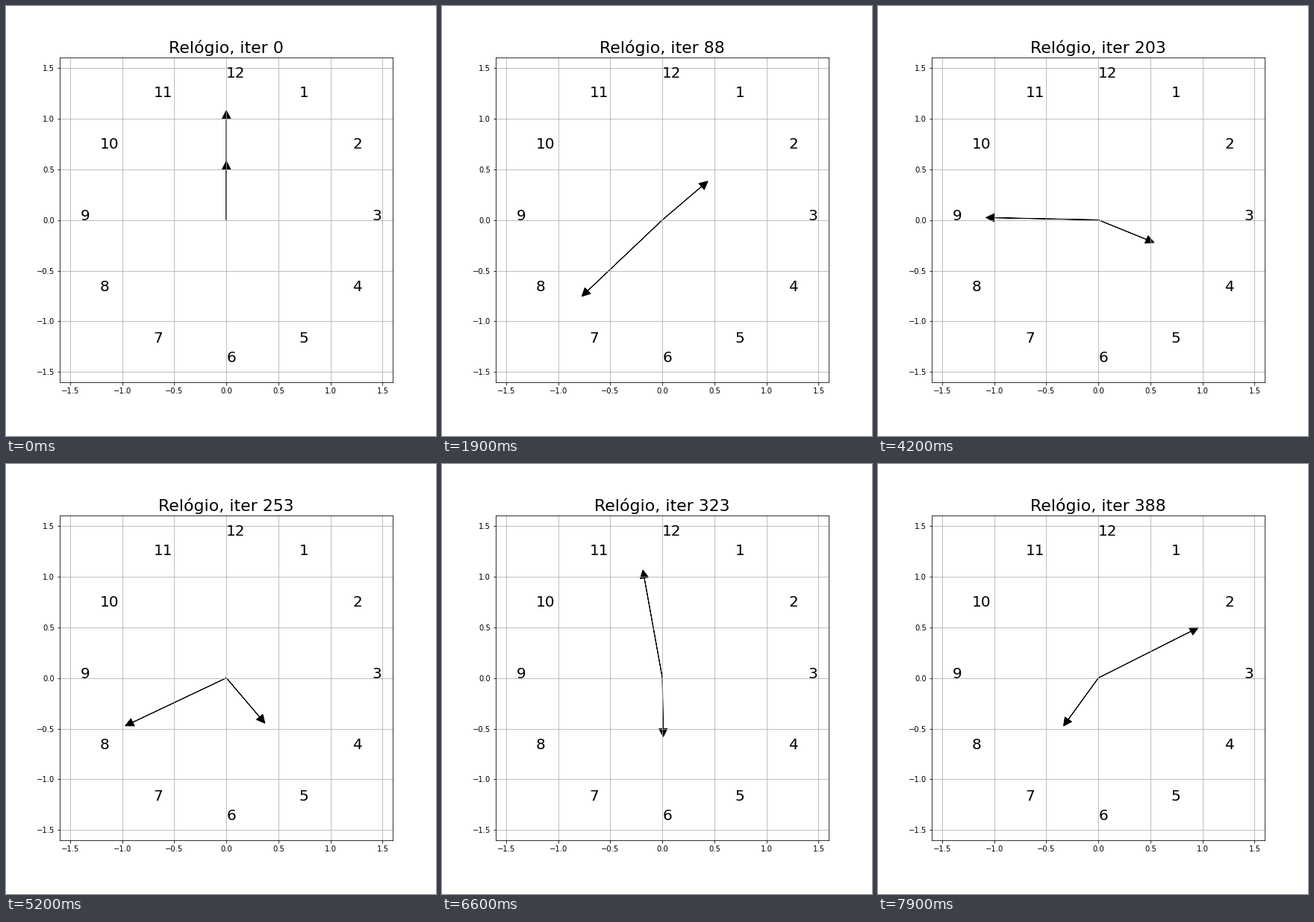
Write a matplotlib script that moves like this. It is 576 by 576 pixels and loops after 8000 ms.

```python
import numpy as np
import matplotlib.pyplot as plt
from matplotlib.animation import FuncAnimation

plt.rcParams["font.family"] = "DejaVu Sans"

FRAMES, INTERVAL = 80, 100
STEPS = 649      # iterations in one full turn of the hour hand
RADIUS = 1.4     # distance of the numerals from the centre
LIMIT = 1.6


def polar(angle, length):
    """Point at a clockwise angle from twelve o'clock."""
    return length * np.sin(angle), length * np.cos(angle)


fig = plt.figure(figsize=(8, 8), dpi=72, facecolor="white")
ax = fig.add_axes([0.125, 0.125, 0.775, 0.755])
ax.set(xlim=(-LIMIT, LIMIT), ylim=(-LIMIT, LIMIT))
ticks = np.arange(-1.5, 1.6, 0.5)
ax.set_xticks(ticks)
ax.set_yticks(ticks)
ax.tick_params(labelsize=10)
ax.grid(True)
title = ax.set_title("", fontsize=22)

for hour in range(1, 13):
    ax.text(*polar(hour * np.pi / 6, RADIUS), str(hour), fontsize=20)


def make_hand(length):
    return ax.arrow(0, 0, 0, length, head_width=0.08, head_length=0.08,
                    fc="k", ec="k")


hour_hand = make_hand(0.5)
minute_hand = make_hand(1)


def point(hand, angle, length):
    dx, dy = polar(angle, length)
    hand.set_data(dx=dx, dy=dy)


def update(n):
    # slow start, then five iterations per frame
    step = max(n, 5 * n - 7)
    angle = 2 * np.pi * step / STEPS
    point(hour_hand, angle, 0.5)
    point(minute_hand, 12 * angle, 1)
    title.set_text(f"Relógio, iter {step}")
    return hour_hand, minute_hand, title


anim = FuncAnimation(fig, update, frames=FRAMES, interval=INTERVAL,
                     repeat=True, repeat_delay=0, blit=False)
plt.show()
```
